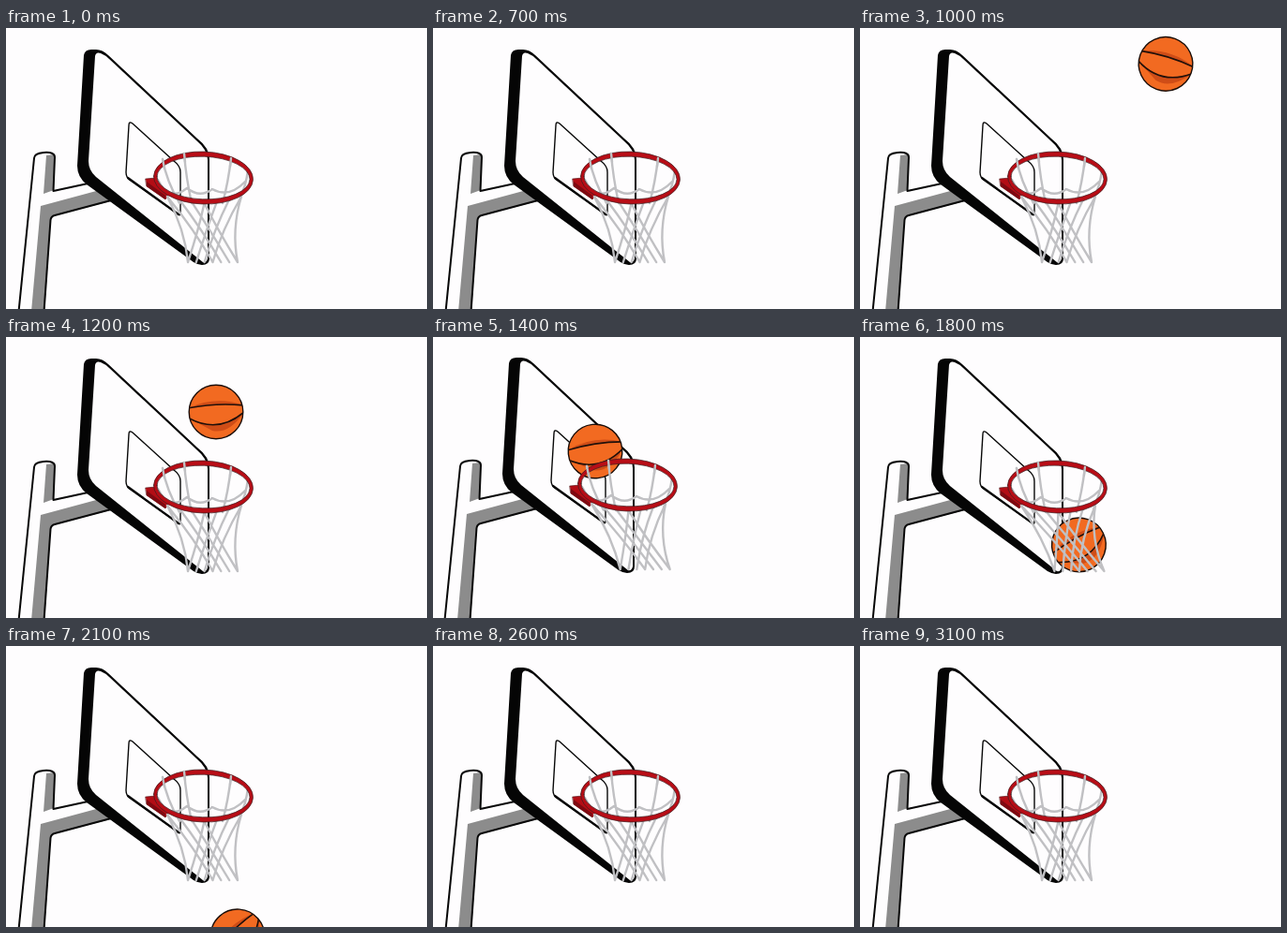
Write an HTML page that moves like this. It is 449 px wide and 300 px high and loops after 3900 ms.

```html
<!DOCTYPE html>
<html lang="en">
<head>
<meta charset="utf-8">
<title>Basketball shot</title>
<style>
html, body { margin: 0; width: 100%; height: 100%; overflow: hidden; background: #fefdfe; }
svg { display: block; width: 100vw; height: 100vh; }
</style>
</head>
<body>
<svg viewBox="0 0 449 300" fill="none" stroke-linejoin="round" stroke-linecap="round">
  <defs><clipPath id="round"><circle r="28.5"/></clipPath></defs>

  <g id="pole">
    <path d="M43 136L52 135L51 173L40 177ZM37 190L100 173L112 185L48 201L41 303H27Z" fill="#8c8c8c"/>
    <path d="M13.500 303L30 139Q30 134 40 133Q52 132 52 138L50.500 174L92 165M112 184L52 200Q48 201 47.500 205L40.500 303" stroke="#080808" stroke-width="2"/>
  </g>

  <g id="board">
    <path d="M83 29Q84 23 91 23H96Q103 23 109 29L204 118Q217 128 217 140V246Q217 253 209 253Q205 253 200 250L86 167Q76 159 76 147Z" fill="#050505"/>
    <path d="M95 30Q96 25 101 27Q106 29 110 33L203 120Q215 130 215 141V246Q214 251 210 250L96 159Q88 152 88 142Z" fill="#fefdfe"/>
    <path d="M184 199L133 163Q128 160 128 154L131 104Q131 99 135 102L179 142Q186 147 186 154V197Q186 201 184 199" stroke="#080808" stroke-width="1.4"/>
    <path d="M130 160L184 199" stroke="#080808" stroke-width="2.2"/>
  </g>

  <g id="ball">
    <circle r="28.800" fill="#f26a21"/>
    <g clip-path="url(#round)">
      <path d="M-30-4Q0-18 30-7Q0-10-30-4ZM-30 6Q2 24 30 0Q14 24-4 20Z" fill="#cf4d17"/>
      <path d="M-30-4Q0-10 30-7M-30 6Q2 24 30 0" stroke="#20100a" stroke-width="1.6"/>
    </g>
    <circle r="28.800" stroke="#1a0d08" stroke-width="1.4"/>
  </g>

  <g id="hoop">
    <path d="M149 161L160 160L173 179L170 183L150 169Z" fill="#b30d15" stroke="#4c090d" stroke-width=".6"/>
    <path d="M150 164L170 179V183L150 169Z" fill="#7e0911"/>
    <path id="net" stroke="#c0c0c3" stroke-width="2.4"/>
    <path d="M-53 0A53 28 0 0 1 53 0A53 28 0 0 1-53 0ZM-49.500 0A49.500 22.800 0 0 0 49.500 0A49.500 22.800 0 0 0-49.500 0Z"
      transform="translate(210.500 160) rotate(2)" fill="#b80d16" stroke="#3c2022" stroke-width=".7"/>
    <path d="M167 140L169 150M190 134L191 143M240 139L239 148" stroke="#c0c0c3" stroke-width="2.4"/>
  </g>
</svg>
<script>
const LOOP = 3900, STEP = 100;
const CORDS = 6, REACH = 3;
const $ = id => document.getElementById(id);

// Steps count 100 ms from the moment named in each helper.
const since = (t, t0) => (t - t0) / STEP;

function ballAt(t) {
  if (t < 1400) {
    const s = since(t, 1200);
    return { x: 224 - 51 * s, y: 80 + 24 * s + 1.6 * s * s, angle: -10 * s };
  }
  // rebound: sideways speed fades while the ball falls
  const s = since(t, 1400), fade = 1 - s / 7;
  return { x: 247 - 74 * fade * fade, y: 122 + 22.5 * s + .62 * s * s, angle: -6 - 5 * s };
}

function swayAt(t) {
  const s = since(t, 1300);
  return s > 0 && s < 8 ? 14 * Math.sqrt(Math.sin(Math.PI * s / 8)) : 0;
}

function shakeAt(t) {
  const s = since(t, 1300);
  return s > 0 ? -Math.sin(Math.PI * s / 2) * Math.exp(1 - s) : 0;
}

// one cord from rim position i to hem position j, drawn in at the waist
function cord(i, j, sway) {
  const top = 172 + 79 * i / CORDS, hem = 194 + 53 * j / CORDS + sway;
  const mid = (top + hem) / 2, waist = mid + (214 - mid) * .25;
  const rimY = 180 + 7 * Math.sin(Math.PI * i / CORDS);
  return `M${top} ${rimY}Q${waist} 215 ${hem} 250`;
}

function netPath(sway) {
  let d = 'M167 140Q171 163 185 187M190 134Q192 160 198 187M240 139Q237 165 231 187M258 152Q256 168 249 184'
    + 'M162 162Q174 186 193 171Q207 182 220 172Q238 182 255 164';
  d += cord(0, 0, sway) + cord(CORDS, CORDS, sway);
  for (let i = 0; i + REACH <= CORDS; i++) {
    d += cord(i, i + REACH, sway) + cord(i + REACH, i, sway);
  }
  return d;
}

const move = (id, x, y, angle = 0) =>
  $(id).setAttribute('transform', `translate(${x} ${y}) rotate(${angle})`);

function draw(t) {
  const { x, y, angle } = ballAt(t);
  move('ball', x, y, angle);
  $('ball').style.display = t > 700 && t < 2200 ? '' : 'none';
  const k = shakeAt(t);
  move('pole', k, k);
  move('board', 2 * k, k);
  move('hoop', 3 * k, 2 * k);
  $('net').setAttribute('d', netPath(swayAt(t)));
}

const start = performance.now();
function tick() {
  const t = (performance.now() - start) % LOOP;
  draw(Math.floor(t / STEP) * STEP);
  requestAnimationFrame(tick);
}
tick();
</script>
</body>
</html>
```
